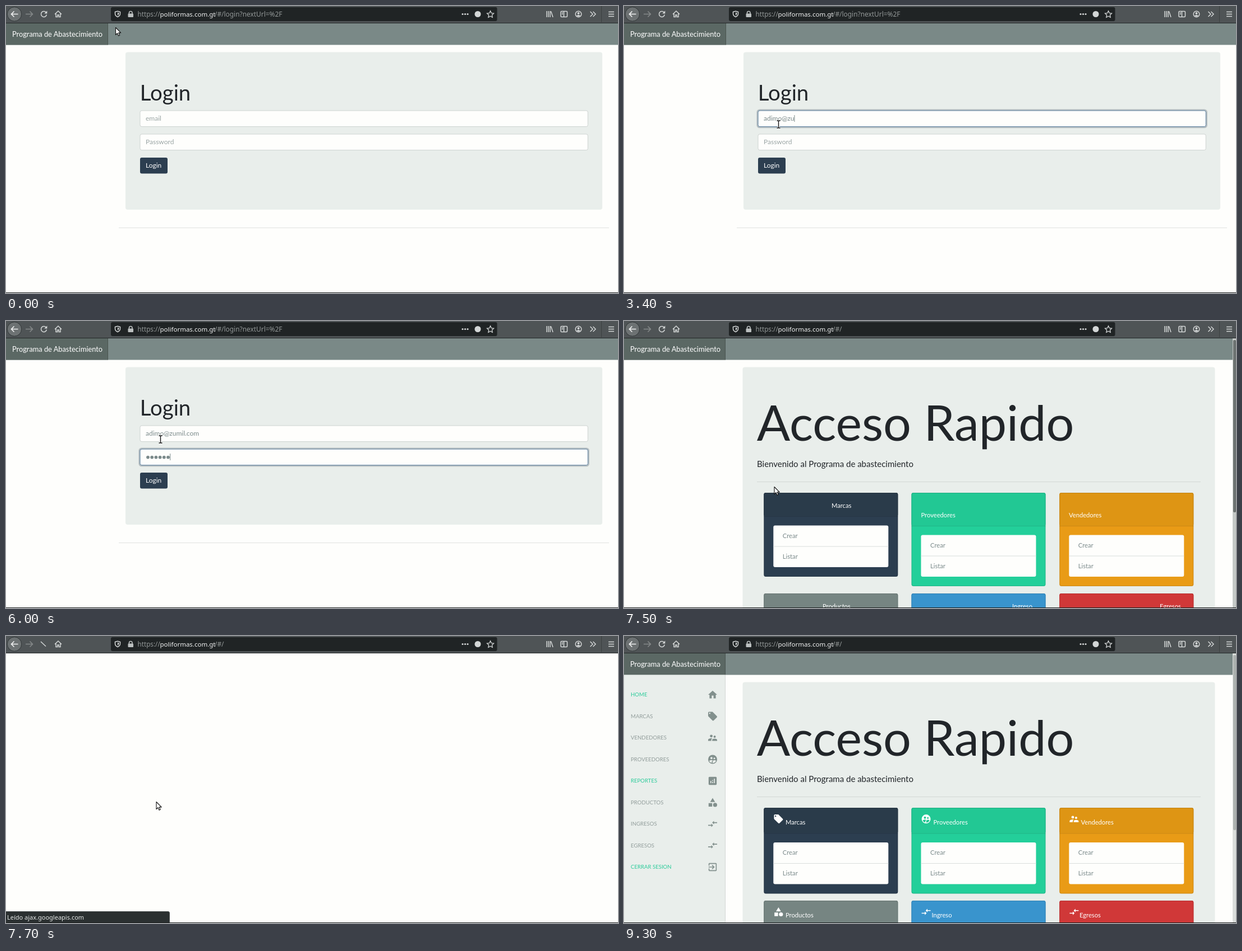
An HTML page that plays this animation: 1091 px wide and 513 px high, repeating every 9400 ms.

```html
<!DOCTYPE html>
<html lang="es">
<head>
<meta charset="utf-8">
<title>Login</title>
<style>
html, body { margin: 0; width: 100%; height: 100%; overflow: hidden; background: #fefefc; }
svg { display: block; width: 1091px; height: 513px; }
text { font-family: Lato, sans-serif; white-space: pre; }
.ui { font-family: "Noto Sans", "Open Sans", sans-serif; }
.line { fill: none; stroke: #d3d6d6; stroke-width: 1.5; }
</style>
</head>
<body>
<svg id="stage" viewBox="0 0 1091 513" xmlns="http://www.w3.org/2000/svg"></svg>
<script>
const LOOP = 9400, STEP = 100;
const PAGE = '#fefefc', PANEL = '#e9eeeb', INK = '#212529', GREY = '#7b8a8b';
const TITLE = 'Programa de Abastecimiento';
const EMAIL = 'adimo@zumil.com';
const EMAIL_KEYS = [1700, 1900, 2000, 2100, 2300, 3000, 3100, 3400, 3500, 3600, 3700, 3800, 4100, 4200, 4200];
const PASS_KEYS = [5000, 5200, 5400, 5600, 5800, 6000];

const ICONS = {
  home: 'M10 20v-6h4v6h5v-8h3L12 3 2 12h3v8z',
  tag: 'M21.4 11.6l-9-9C12 2.2 11.5 2 11 2H4c-1.1 0-2 .9-2 2v7c0 .55.2 1.05.6 1.4l9 9c.8.8 2 .8 2.8 0l7-7c.8-.8.8-2 0-2.8zM5.5 7a1.5 1.5 0 1 1 0-3a1.5 1.5 0 1 1 0 3z',
  people: 'M16.5 12a2.5 2.5 0 1 0 0-5a2.5 2.5 0 1 0 0 5zM9 11a3 3 0 1 0 0-6a3 3 0 1 0 0 6zm7.5 3c-1.83 0-5.5.92-5.5 2.75V19h11v-2.25c0-1.83-3.67-2.75-5.5-2.75zM9 13c-2.33 0-7 1.17-7 3.5V19h7v-2.25c0-.85.33-2.34 2.37-3.47C10.5 13.1 9.66 13 9 13z',
  group: 'M12 2a10 10 0 1 0 0 20a10 10 0 1 0 0-20zM9.4 6.7a2.4 2.4 0 1 1 0 4.8a2.4 2.4 0 1 1 0-4.8zM15.8 7.8a1.9 1.9 0 1 1 0 3.8a1.9 1.9 0 1 1 0-3.8zM4.4 15.6c1-2.1 6.3-2.8 8.2-1.3c-2 1-2.6 2.6-2.6 5.4c-2.700-.6-4.600-2-5.600-4.100zM12 20c0-3.400.7-6.100 3.800-6.100c1.600 0 3.200.5 3.900 1.400c-1.300 2.900-4 4.700-7.700 4.700z',
  chart: 'M19 3H5c-1.1 0-2 .9-2 2v14c0 1.1.9 2 2 2h14c1.1 0 2-.9 2-2V5c0-1.100-.9-2-2-2zM9 17H7v-5h2zM13 17h-2v-3h2zM13 12h-2v-2h2zM17 17h-2V7h2z',
  shapes: 'M12 2l-5.500 9h11zM17.500 13a4.500 4.500 0 1 0 0 9a4.500 4.500 0 1 0 0-9zM3 13.500h8v8H3z',
  arrows: 'M9 14H2v2h7v3l4-4-4-4zM15 13v-3h7V8h-7V5l-4 4z',
  exit: 'M10.100 15.600L11.500 17l5-5-5-5-1.400 1.400L12.700 11H3v2h9.700zM19 3H5c-1.100 0-2 .9-2 2v4h2V5h14v14H5v-4H3v4c0 1.100.9 2 2 2h14c1.100 0 2-.9 2-2V5c0-1.100-.9-2-2-2z'
};

const rect = (x, y, w, h, fill, more = '') =>
  `<rect x="${x}" y="${y}" width="${w}" height="${h}" fill="${fill}" ${more}/>`;
const text = (x, y, size, fill, str, more = '') =>
  `<text x="${x}" y="${y}" font-size="${size}" fill="${fill}" ${more}>${str}</text>`;
const path = (d, more = 'class="line"') => `<path d="${d}" ${more}/>`;
const group = (id, body) => `<g id="${id}">${body}</g>`;
const icon = (name, x, y, fill) =>
  path(ICONS[name], `fill="${fill}" fill-rule="evenodd" transform="translate(${x} ${y}) scale(.8)"`);

function toolbar() {
  const pale = 'fill="#d3d6d6"';
  return rect(0, 0, 1091, 30, '#4f5456') + rect(0, 30, 1091, 1, '#232728')
    + '<circle cx="15" cy="14.500" r="12.700" fill="#6d7273" stroke="#303536"/>'
    + path('M21.500 14.500H9.500M14.500 9.500l-5 5 5 5', 'fill="none" stroke="#f1f2f2" stroke-width="1.600"')
    + path('M35 14.500H47.500M42.500 9.500l5 5-5 5', 'fill="none" stroke="#85898a" stroke-width="1.500"')
    + group('reload', path('M71.300 11.300A5 5 0 1 0 72.400 15.500') + path('M73.300 8.500v5h-5z', pale))
    + group('arc', path('M63 11.500A5.500 5.500 0 0 1 72.500 17', 'fill="none" stroke="#777c7d" stroke-width="1.500"'))
    + group('slash', path('M62 10l9 8.500'))
    + path('M87 14.800l6-5.800 6 5.800M89 13.500v6h2.800v-3.500h2.400v3.500H97v-6')
    + rect(187, 2, 688.5, 25, '#202425', 'rx="3"')
    + path('M194.500 10.500l4.500-1.300 4.500 1.300v3c0 3-2 5-4.500 6-2.500-1-4.500-3-4.500-6z')
    + path('M199 11.500v5.500c1.500-.8 2.300-2 2.300-3.500v-1.300z', pale)
    + rect(217.5, 13.5, 9.5, 6.5, '#bcc0c0', 'rx="1"')
    + path('M219.500 14v-1.800a2.700 2.700 0 0 1 5.500 0V14', 'fill="none" stroke="#bcc0c0" stroke-width="1.600"')
    + text(234.5, 18.5, 11.7, '#939898', 'https://', 'class="ui"')
    + text(274.5, 18.5, 11.5, '#f0f1f1', 'poliformas.com.gt', 'class="ui"')
    + text(372, 18.5, 11.9, '#939898', '', 'class="ui" id="route"')
    + [814, 818.5, 823].map(x => `<circle cx="${x}" cy="14.500" r="1.600" ${pale}/>`).join('')
    + `<circle cx="841" cy="14.500" r="5.500" ${pale}/>`
    + path('M863.500 8.800l1.800 3.900 4.200.5-3.100 2.900.8 4.200-3.700-2.100-3.700 2.100.8-4.200-3.100-2.900 4.200-.5z', 'fill="none" stroke="#d3d6d6" stroke-width="1.300"')
    + path('M964 9v11M967 9v11M970 9v11M971.500 9.500l3.500 10.500')
    + rect(989, 9.5, 11.5, 10, 'none', 'rx="1.500" stroke="#d3d6d6" stroke-width="1.500"')
    + path('M994.500 9.500v10M991 12.200h2M991 14.500h2')
    + '<circle cx="1020.500" cy="14.500" r="5.300" class="line"/>'
    + `<circle cx="1020.500" cy="13" r="2" ${pale}/>` + path('M1017 17.300q3.500-3 7 0q-3.500 3-7 0z', pale)
    + path('M1041.500 10l4.500 4.500-4.500 4.500M1046.500 10l4.500 4.500-4.500 4.500')
    + rect(1061, 0, 1, 29, '#3b4041')
    + path('M1074 10.500h10M1074 14.500h10M1074 18.500h10');
}

function navbar(width, split) {
  return rect(0, 31, width, 38.5, '#7a8987') + rect(0, 31, split, 38.5, '#5b6864')
    + rect(split, 31, 1, 38.5, '#49544f') + text(11, 54.5, 12.8, '#fff', TITLE);
}

function field(id, y, hint) {
  return rect(237.7, y - 1.3, 801, 31.2, 'none', `id="${id}Ring" rx="4" stroke="#2c3e50" stroke-width="2.600"`)
    + rect(239, y, 798.3, 28.6, PAGE, `id="${id}Box" rx="3"`)
    + text(249, y + 17.6, 12, '#9aa5a4', hint, `id="${id}Hint"`)
    + rect(249, y + 8, 1, 12, GREY, `id="${id}Caret"`);
}

function login() {
  const dots = PASS_KEYS.map((k, i) => `<circle class="dot" cx="${253 + 7.2 * i}" cy="243.600" r="2.900" fill="${GREY}"/>`);
  return navbar(1091, 181) + rect(213, 82.5, 850, 281.5, PANEL, 'rx="4"')
    + rect(201, 396, 874, 1, '#dfe2e0')
    + text(238.7, 169, 38.4, INK, 'Login')
    + field('mail', 187, 'email') + text(249, 204.6, 12, GREY, '', 'id="mailText"')
    + field('pass', 229, 'Password') + dots.join('')
    + rect(237.7, 269.7, 51.6, 31.2, 'none', 'id="btnRing" rx="4" stroke="#2c3e50" stroke-width="2.600"')
    + rect(239, 271, 49, 28.6, '#2c3e50', 'id="btn" rx="3"')
    + text(249, 288.6, 12, '#fff', 'Login');
}

// head and list are heights of the header and offset of the list
function card(x, y, colors, head, label, labelX, labelY, iconName) {
  const [body, top] = colors, list = y + head + 16.5;
  return rect(x, y, 239, head + 108, body, 'rx="3.500"')
    + rect(x, y, 239, head, top, 'rx="3"')
    + rect(x, y + head, 239, 1, '#000', 'opacity=".12"')
    + rect(x + .5, y + .5, 238, head + 107, 'none', 'rx="3" stroke="#000" stroke-opacity=".13"')
    + rect(x + 17, list, 205, 74.5, PAGE, 'rx="3"') + rect(x + 17, list + 37, 205, 1, '#dadedc')
    + text(x + 33.5, list + 22, 11.2, GREY, 'Crear') + text(x + 33.5, list + 59, 11.2, GREY, 'Listar')
    + text(labelX, labelY, 11.2, '#fff', label)
    + (iconName ? icon(iconName, x + 16.5, y + 10.5, '#fff') : '');
}

const NAVY = ['#2c3e50', '#2a3b4a'], GREEN = ['#23cf9a', '#22c894'], ORANGE = ['#e99b16', '#de9514'];
const STONE = ['#7b8a87', '#768582'], BLUE = ['#3b9ad8', '#3994cd'], RED = ['#d93b3b', '#d03838'];
const COLS = [249.3, 512.5, 776.3];

function plainCards() {
  const [a, b, c] = COLS;
  return card(a, 307, NAVY, 42, 'Marcas', 370, 334) + card(b, 307, GREEN, 59, 'Proveedores', 529.5, 351)
    + card(c, 307, ORANGE, 59, 'Vendedores', 793, 351) + card(a, 487, STONE, 42, 'Productos', 354, 514)
    + card(b, 487, BLUE, 42, 'Ingreso', 692, 514) + card(c, 487, RED, 42, 'Egresos', 955, 514);
}

function iconCards() {
  const [a, b, c] = COLS, h = 45.5;
  return card(a, 307, NAVY, h, 'Marcas', 288, 336.5, 'tag') + card(b, 307, GREEN, h, 'Proveedores', 551.5, 336.5, 'group')
    + card(c, 307, ORANGE, h, 'Vendedores', 814.5, 336.5, 'people') + card(a, 473, STONE, h, 'Productos', 288, 502.5, 'shapes')
    + card(b, 473, BLUE, h, 'Ingreso', 548.5, 502.5, 'arrows') + card(c, 473, RED, h, 'Egresos', 812, 502.5, 'arrows');
}

function sidebar() {
  const items = [['HOME', 'home', 1], ['MARCAS', 'tag'], ['VENDEDORES', 'people'], ['PROVEEDORES', 'group'], ['REPORTES', 'chart', 1],
    ['PRODUCTOS', 'shapes'], ['INGRESOS', 'arrows'], ['EGRESOS', 'arrows'], ['CERRAR SESION', 'exit', 1]];
  return rect(0, 69.5, 180, 443, PANEL) + rect(180, 69.5, 1, 443, '#d3d8d5')
    + items.map(([label, name, on], i) => {
      const y = 105 + 38.5 * i;
      return text(12, y + 3.3, 9.6, on ? '#2bcb9a' : '#929d9b', label) + icon(name, 148.4, y - 9.6, '#82908d');
    }).join('');
}

function home() {
  return navbar(1085, 180) + rect(211.5, 82.5, 842, 440, PANEL, 'rx="4"')
    + text(236.7, 213.5, 88, INK, 'Acceso Rapido')
    + text(237, 261, 15, INK, 'Bienvenido al ' + TITLE.replace('A', 'a'))
    + rect(237, 287, 791, 1, '#d2d7d4')
    + group('plain', plainCards()) + group('full', iconCards() + sidebar())
    + rect(1085, 31, 6, 482, '#c4c8c6', 'id="track"') + rect(1086, 34, 5, 308, '#6c7271', 'id="thumb" rx="2"');
}

function overlays() {
  const edge = 'stroke="#111" stroke-width="1.100" stroke-linejoin="round"';
  const beam = 'M-3-6.500h2.200l.8.700.8-.700H3M0-6V6M-3 6.500h2.200l.8-.700.8.700H3';
  return group('status', path('', 'id="statusBox" fill="#2b3031" stroke="#4b5051"') + text(2, 506.5, 11, '#e6e9e8', '', 'class="ui" id="statusText"'))
    + rect(0, 512, 1091, 1, '#1c1f1f')
    + group('arrow', path('M.5.500v13l3-2.800 2 4.600 2.200-1-2-4.400h4z', `fill="#fff" ${edge}`))
    + group('beam', path(beam, 'fill="none" stroke="#fff" stroke-width="3"') + path(beam, 'fill="none" stroke="#111" stroke-width="1.400"'))
    + group('hand', path('M-1 7V1q1-1.500 2 0v4.500q3-.500 6.500 1.500v3.500q-.500 1.500-1 3H0q-1-2-3.500-4.500q0-2 2.500 0z', `fill="#fff" ${edge}`));
}

const stage = document.getElementById('stage');
stage.innerHTML = rect(0, 0, 1091, 513, PAGE) + group('login', login()) + group('home', home()) + toolbar() + overlays();

const $ = id => document.getElementById(id);
const set = (id, name, value) => $(id).setAttribute(name, value);
const show = (id, on) => set(id, 'visibility', on ? 'inherit' : 'hidden');
const write = (id, str) => { if ($(id).textContent !== str) $(id).textContent = str; };
const clamp = v => Math.max(0, Math.min(1, v));
const ease = v => { v = clamp(v); return v * v * (3 - 2 * v); };
const mix = (a, b, p) => a + (b - a) * p;
const blend = (a, b, p) => `rgb(${a.map((v, i) => Math.round(mix(v, b[i], p)))})`;
const typed = (keys, t) => keys.filter(k => k <= t).length;
const dots = [...document.querySelectorAll('.dot')];

function focus(id, p) {
  set(id + 'Ring', 'stroke-opacity', .27 * p);
  set(id + 'Box', 'stroke', blend([205, 211, 209], [89, 126, 158], p));
}

function pointer(t) {
  if (t >= 9000) return ['none', 0, 0];
  if (t >= 8600) {
    const p = Math.pow((t - 8500) / 400, 1.3);
    return ['arrow', mix(268, 41, p), mix(296, 6, p)];
  }
  if (t >= 7500) return ['arrow', 267.5, 296];
  if (t >= 6800) return ['hand', 268, 296];
  const p = t < 400 ? 0 : ease((t - 300) / 500);
  const y = mix(38, 211.5, p);
  return [y > 187 ? 'beam' : 'arrow', mix(195, 275.5, p), y];
}

function render(now) {
  const t = Math.floor((now % LOOP) / STEP) * STEP;
  const tab = ease((t - 4370) / 190), leave = ease((t - 6970) / 190);
  const n = typed(EMAIL_KEYS, t), m = typed(PASS_KEYS, t);

  show('login', t < 7500);
  focus('mail', ease((t - 1140) / 150) * (1 - tab));
  focus('pass', tab * (1 - leave));
  set('btnRing', 'stroke-opacity', .4 * leave);
  set('btn', 'fill', t >= 6800 ? '#1f2c39' : '#2c3e50');
  write('mailText', EMAIL.slice(0, n));
  show('mailHint', !n);
  show('mailCaret', t >= 1200 && t < 4400);
  set('mailCaret', 'x', 249 + (n ? $('mailText').getComputedTextLength() : 0));
  show('passHint', !m);
  show('passCaret', t >= 4400 && t < 6800);
  set('passCaret', 'x', 249 + 7.2 * m);
  dots.forEach((d, i) => d.setAttribute('visibility', i < m ? 'inherit' : 'hidden'));

  const blank = t === 7700, full = t >= 7800;
  show('home', t >= 7500 && !blank);
  show('plain', !full);
  show('full', full);
  const idle = t >= 9300;
  set('track', 'fill', idle ? '#dadddb' : '#c4c8c6');
  set('thumb', 'fill', idle ? '#adb2b0' : '#6c7271');
  set('thumb', 'height', idle ? 313 : 308);

  write('route', t < 7500 ? '/#/login?nextUrl=%2F' : '/#/');
  const arc = t === 7600 || t === 7800;
  show('arc', arc);
  show('slash', blank);
  show('reload', !arc && !blank);
  show('status', t === 7600 || blank);
  set('statusBox', 'd', `M-1 492.500H${blank ? 289 : 254.500}q2.500 0 2.500 2.500V514H-1z`);
  write('statusText', blank ? 'Leído ajax.googleapis.com' : 'poliformas.com.gt');

  const [kind, x, y] = pointer(t);
  for (const id of ['arrow', 'beam', 'hand']) {
    show(id, id === kind);
    set(id, 'transform', `translate(${x} ${y})`);
  }
}

const start = performance.now();
function tick() {
  render(performance.now() - start);
  requestAnimationFrame(tick);
}
tick();
</script>
</body>
</html>
```
